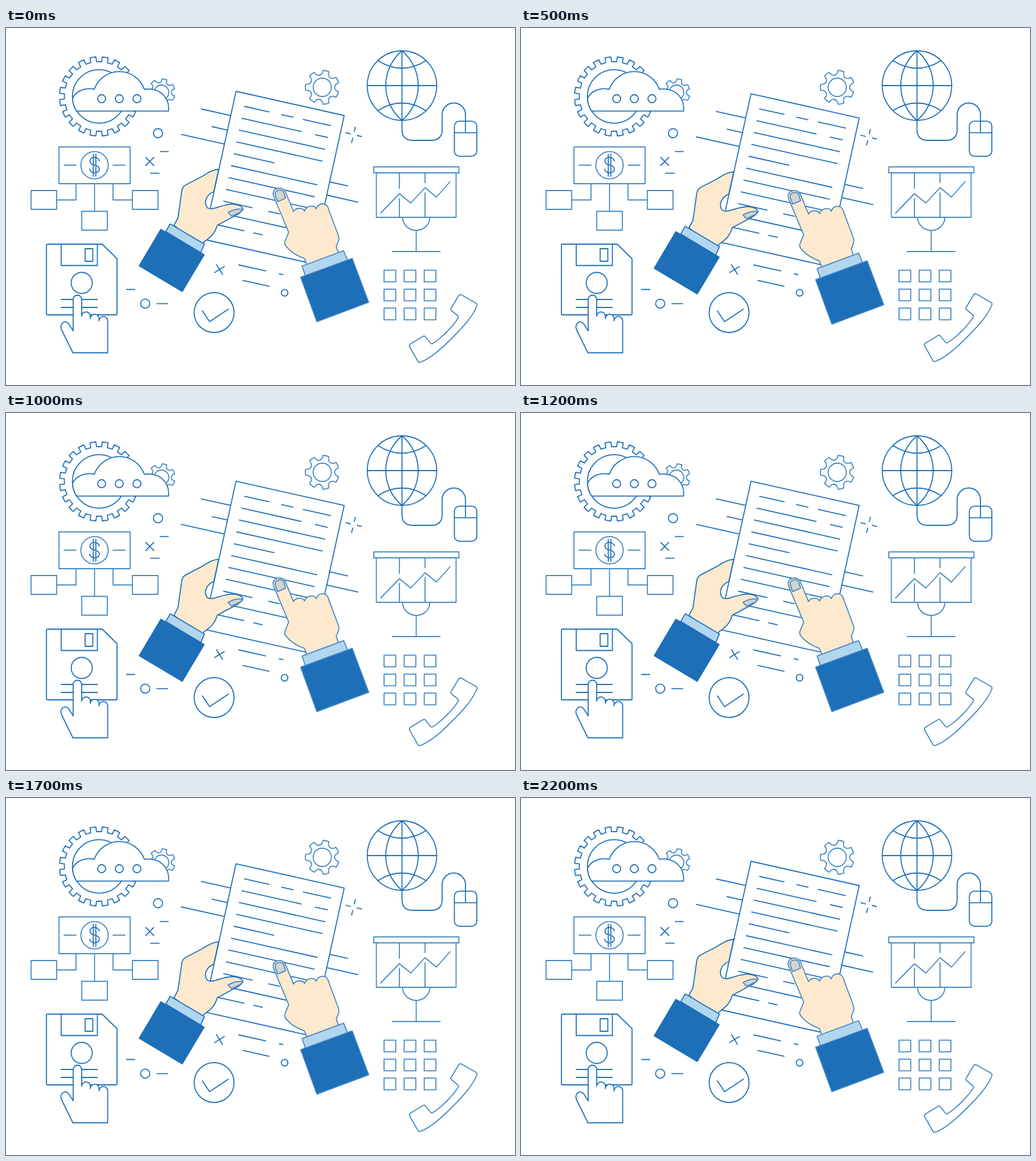
An HTML page that plays this animation: 894x626 px, repeating every 2.3 s.

```html
<!DOCTYPE html>
<html>
<head>
<meta charset="utf-8">
<style>
  html, body { margin: 0; width: 100%; height: 100%; overflow: hidden; background: #fff; }
  svg { display: block; }
  .dark { stroke: #1d6fb8; }
  .light { stroke: #4387c3; }
  .white { fill: #fff; }
  .skin { fill: #fde9cd; }
  .nail { fill: #d2d4d0; }
  .cuff { fill: #b2d6f0; }
  .sleeve { fill: #1d6fb8; }
</style>
</head>
<body>
<svg width="894" height="626" viewBox="0 0 894 626" fill="none" stroke-width="1.8" stroke-linecap="round" stroke-linejoin="round">
  <!-- cloud and gears -->
  <g class="light">
    <path id="smallGear"/><circle cx="273" cy="113" r="13"/>
    <path id="topGear"/><circle cx="555.5" cy="104" r="16"/>
  </g>
  <g class="dark">
    <path id="bigGear" class="white"/>
    <circle cx="163.5" cy="120" r="46.8"/>
    <path class="white" d="M124 145.7Q117 135 117 123C123 110 139 104 155 107.5A46.7 46.7 0 0 1 243 107.5C268 104 288 120 285.500 145.700Z"/>
    <path id="dots"/>
  </g>

  <!-- small marks -->
  <g class="dark">
    <circle cx="267" cy="184.5" r="8"/><circle cx="244.5" cy="483.3" r="8"/><circle cx="489.3" cy="464.2" r="5.8"/>
    <path d="M271 216.7h14M254 254.7h15M212 458.5h14M265 483.3h19M245.5 227l14 14m0-14l-14 14"/>
    <path d="M365 423.5h20m-10-10v20" transform="rotate(58 375 423.5)"/>
    <path id="marks"/>
    <circle cx="365.5" cy="499" r="35"/>
    <path d="M345 496L357.5 515L390.5 493"/>
  </g>

  <!-- money chart -->
  <g class="light">
    <path d="M93 208.5h125v64.500h-125ZM102 240.500h21m65 0h21M123 273v28.500h-34M155.500 273v48.500M188 273v28.500h34"/>
    <path d="M44 285h45v33h-45ZM222 285h45v33h-45ZM133 321.500h45v33h-45Z"/>
    <circle cx="155.5" cy="240.7" r="24"/>
    <path class="dark" d="M164 233C162 225 147.500 225 147.500 233C147.500 243 164 238 164 247.500C164 256 148 256 147 247.500M153.300 221.500v38.500m4.500 0v-38.500"/>
  </g>

  <!-- disk and pointing hand -->
  <g class="dark">
    <path d="M73 379H169L195 404.500V501Q195 503 193 503H73Q71 503 71 501V381Q71 379 73 379ZM97 379v37.500h63.500v-37.500M139 387h13.500v22h-13.500ZM97 476h63.500M97 490h63.500"/>
    <circle cx="133" cy="447" r="18.5"/>
    <path id="pointer" class="white"/>
  </g>

  <!-- globe and mouse -->
  <g class="dark">
    <circle cx="695.5" cy="101" r="61"/>
    <path d="M695.5 40a79.500 79.500 0 0 0 0 122a79.500 79.500 0 0 0 0-122V178q0 19 19 19H747q19 0 19-19V152a20.500 20.500 0 0 1 41 0v31.700M634.500 101h122M653 57q42.500 27 85 0M653 145q42.500-27 85 0M787.500 183.700h39.500"/>
    <rect x="787.5" y="163.3" width="39.5" height="61.5" rx="9"/>
  </g>

  <!-- presentation board, keypad and phone -->
  <g class="light">
    <path d="M646 243.500h149.500v10.500h-149.500ZM650.500 254v78h140v-78M691 254v27m0 18v33M736 254v17m0 18v43"/>
    <path d="M658 324.500L691 290.500L711 307L736 280L756 296.500L780 269.500M696.500 332a24 23 0 0 0 48 0M720.500 355v37M678.500 392h84"/>
    <path id="keys"/>
    <g id="phone">
      <path id="half" d="M784 543C805 522 820 505 827 487Q828 484 825.500 482.500L800 468Q797 466.500 795 469.500L782 491Q780 494 783 496L793 504Q795.500 506 794.500 508Q788 519 774 533"/>
      <use href="#half" transform="matrix(0 1 1 0 241 -241)"/>
    </g>
  </g>

  <!-- document and hands -->
  <g id="doc" class="dark">
    <path class="white" d="M404 111L594 153.500L537 413L347 370.500Z"/>
    <path id="text"/>
    <path d="M613.500 174l-1.800 7.500M609 193l-2 8M597 183.700l8 2M617 188.500l7.500 1.800"/>

    <path class="skin" d="M365 287C352 292 346 306 354 315.500C364 321 380 308 400 309C411 310 418 315 415.500 319Q412 325 397 332L371 346C367 361 359 367 348 375L342 384L295 346L302 333L308.500 287Q309 279 316 275L345 260C358 251 366 248 373.500 248Z"/>
    <path class="nail light" d="M390 323.500C398 319 407 316 415.500 318L412 322.500L396 330Z"/>
    <path class="cuff" d="M288.500 343.500L348.500 379L342 394L280.500 357Z"/>
    <path class="sleeve" d="M272 353L348 397.500L309.500 462L234 417Z"/>

    <g class="light">
      <path class="skin" d="M529 416L524 404Q504 397 493 384Q488 379 490 374L496.500 358L470 295C465 279 487 276 491 288L505 322C508 315 521 314 524.500 321C527 312 541 309 545 317C548 305 565 305 567 319L583.500 363Q586 370 583 376L580 383L584 395Z"/>
      <path class="nail" d="M473 293.500C470 284 485 280 488 288.500L491 298.500L477 304.500Z"/>
      <path class="cuff" d="M520 417.500L593 390.500L600 407L526 435Z"/>
      <path class="sleeve" d="M517.500 437L608 404L637 481L546 515Z"/>
    </g>
  </g>
</svg>
<script>
const $ = id => document.getElementById(id);
const draw = (id, d) => $(id).setAttribute('d', d);
const repeat = (n, part) => Array.from({ length: n }, (_, i) => part(i)).join('');

// Teeth at radius R, valleys at r; half-widths of tip and foot in degrees.
function gear(id, x, y, n, R, r, tip, foot, rot, hollow) {
  const at = (rad, deg) => {
    const a = deg * Math.PI / 180;
    return `${x + rad * Math.cos(a)} ${y + rad * Math.sin(a)}`;
  };
  draw(id, repeat(n, i => {
    const a = rot + i * 360 / n, next = a + 360 / n;
    return (i ? 'L' : 'M') + at(r, a - foot) + 'L' + at(R, a - tip) +
      `A${R} ${R} 0 0 1 ` + at(R, a + tip) + 'L' + at(r, a + foot) +
      (hollow ? 'Q' + at(hollow, (a + next) / 2) : `A${r} ${r} 0 0 1`) + ' ' + at(r, next - foot);
  }) + 'Z');
}
gear('bigGear', 163.5, 120, 20, 69.5, 61, 4.3, 4.8, 9);
gear('topGear', 555.5, 104, 7, 29.8, 25, 10, 13, 180, 19);
gear('smallGear', 273, 113, 7, 24, 20, 10, 13, 180, 15);

draw('dots', repeat(3, i => `M${161 + 31 * i} 124a7 7 0 0 1 14 0a7 7 0 0 1-14 0`));
draw('keys', repeat(9, i =>
  `M${664 + 35.3 * (i % 3)} ${424.7 + 33.2 * Math.floor(i / 3)}h20.5v20.5h-20.5Z`));

const knuckles = repeat(3, i => `V${505.5 + 4 * i}a7.6 7.6 0 0 1 15.2 0`);
draw('pointer', `M118 531V476a7.5 7.5 0 0 1 15 0${knuckles}V569.5H117.500L98 530C92 518 105 510 111 520Z`);

// A stroke of width w along the tilt of the page.
const tilt = 0.223;
const stroke = (x, y, w) => `M${x} ${y}l${w} ${w * tilt}`;

// Rows are full unless listed as alternating stroke and gap widths.
const broken = { 0: [43, 22, 20, 18, 48], 1: [104, 25, 21], 4: [70], 8: [50, 29, 19], 10: [45, 17, 15] };
const row = i => {
  let x = 0;
  return (broken[i] || [150]).map((w, k) => {
    const from = x;
    x += w;
    return k % 2 ? '' : stroke(419 - 4.6 * i + from, 137.5 + 20.8 * i + from * tilt, w);
  }).join('');
};
draw('text', repeat(11, row) + stroke(343, 142, 51) + stroke(362, 173, 27) +
  stroke(308, 186.7, 75) + stroke(569, 270, 31) + stroke(563, 293, 55));
draw('marks', stroke(409, 415.5, 47) + stroke(416, 442.7, 46) + stroke(480, 431, 6.5));

const start = performance.now();
function tick() {
  const step = Math.floor((performance.now() - start) / 100) % 23;
  const shift = 11 - Math.abs(11 - step);
  $('doc').setAttribute('transform', `translate(0 ${shift * 0.86})`);
  $('phone').setAttribute('transform', `translate(0 ${-shift * 0.3})`);
  requestAnimationFrame(tick);
}
tick();
</script>
</body>
</html>
```
